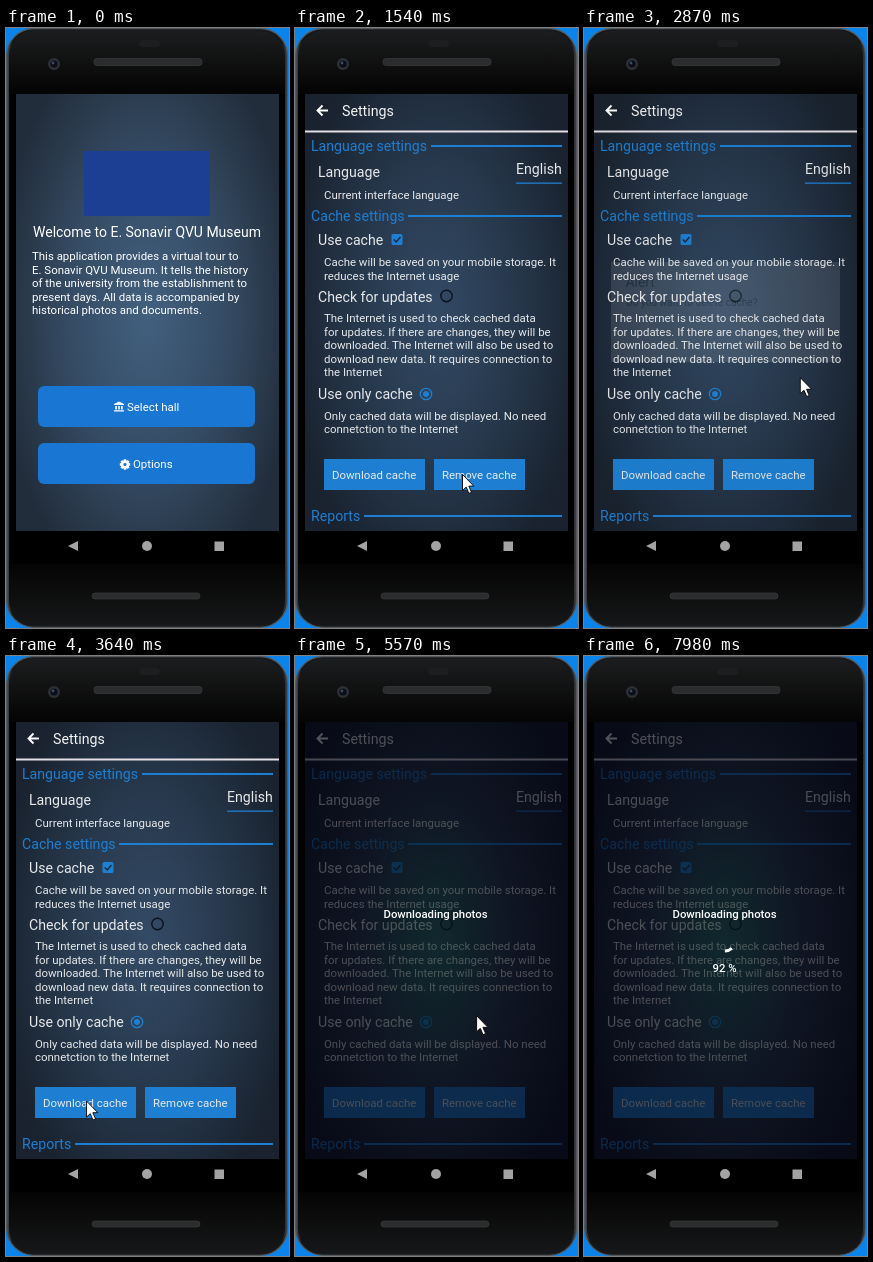
Recreate the animation shown at these times as an HTML page. Size 283x600 px, loop 8000 ms.

```html
<!DOCTYPE html>
<html lang="en">
<head>
<meta charset="utf-8">
<title>Museum app</title>
<style>
  html, body { margin: 0; width: 100%; height: 100%; overflow: hidden; background: #0a84ea; }
  svg { display: block; width: 283px; height: 600px; font-family: Roboto, sans-serif; }
</style>
</head>
<body>
<svg id="stage" viewBox="0 0 283 600" xmlns="http://www.w3.org/2000/svg"></svg>
<script>
const LOOP = 8000;
const SMALL = 11.45, BIG = 14.15;
const BLUE = '#1e7fd2';

const text = (x, y, str, size = SMALL, fill = '#e6e8ea', extra = '') =>
  `<text x="${x}" y="${y}" font-size="${size}" fill="${fill}" ${extra}>${str}</text>`;
const lines = (x, y, rows, fill) =>
  rows.map((row, i) => text(x, y + i * 13.5, row, SMALL, fill)).join('');
const rect = (x, y, w, h, fill, extra = '') =>
  `<rect x="${x}" y="${y}" width="${w}" height="${h}" fill="${fill}" ${extra}/>`;
const screenRect = (fill, extra) => rect(10, 66, 263, 437, fill, extra);
const glow = (id, inner, mid, outer) =>
  `<radialGradient id="${id}" gradientUnits="userSpaceOnUse" cx="0" cy="0" r="1"
    gradientTransform="translate(141 285) scale(150 290)">
    <stop stop-color="${inner}"/><stop offset=".55" stop-color="${mid}"/>
    <stop offset="1" stop-color="${outer}"/></radialGradient>`;

const defs = `<defs>
  ${glow('homeBg', '#42607f', '#344a62', '#222d3b')}
  ${glow('settingsBg', '#334a65', '#26374b', '#19222e')}
  ${glow('loadBg', '#001814', '#04040f', '#00000c')}
  <linearGradient id="rim" x2="1" y2="0">
    <stop stop-color="#4a4d50"/><stop offset=".02" stop-color="#17181a"/>
    <stop offset=".98" stop-color="#17181a"/><stop offset="1" stop-color="#3c3f42"/>
  </linearGradient>
  <linearGradient id="body" x2="0" y2="1">
    <stop stop-color="#1c1d1e"/><stop offset=".1" stop-color="#050505"/>
    <stop offset=".9" stop-color="#050505"/><stop offset="1" stop-color="#161718"/>
  </linearGradient>
  <clipPath id="screen">${screenRect('#000')}</clipPath>
  <clipPath id="wave"><path d="M0 3q7-5 14-1t14-1v15q-7 4-14 1t-14 1z"/></clipPath>
</defs>`;

const phone = `
  ${rect(0, 0, 283, 600, '#0a84ea')}
  ${rect(.7, .7, 280.8, 598.6, 'url(#rim)', 'rx="27" stroke="#55585b" stroke-width="1.2"')}
  ${rect(3, 3, 276, 594, 'url(#body)', 'rx="25"')}
  ${rect(4, 66, 275, 470, '#000')}
  ${rect(133, 12, 21, 7, '#1d1e20', 'rx="3.5"')}
  ${rect(88, 30.5, 108, 7, '#2b2c2e', 'rx="3" stroke="#3a3b3d" stroke-width=".7"')}
  ${rect(86, 565, 108, 6, '#2b2c2e', 'rx="3" stroke="#3a3b3d" stroke-width=".7"')}
  <circle cx="48" cy="36" r="6" fill="#2d3035"/><circle cx="48" cy="36" r="3.6" fill="#0b0e16"/>
  <circle cx="47" cy="35" r="1.4" fill="#3b4a68"/>
  <g fill="#a3a3a3"><path d="M62 518l10-5v10z"/><circle cx="141" cy="518" r="5"/>
  ${rect(208.5, 513.5, 9.5, 9.5, '#a3a3a3')}</g>`;

const teeth = Array.from({ length: 8 }, (_, i) =>
  rect(-1.3, -5.2, 2.6, 3, '#fff', `transform="rotate(${i * 45})"`)).join('');

const home = `
  ${screenRect('url(#homeBg)')}
  ${rect(78, 123, 126, 65, '#1d3f93')}
  ${text(27, 209, 'Welcome to E. Sonavir QVU Museum', 14, '#fff')}
  ${lines(26, 232, ['This application provides a virtual tour to',
    'E. Sonavir QVU Museum. It tells the history',
    'of the university from the establishment to',
    'present days. All data is accompanied by',
    'historical photos and documents.'], '#fff')}
  ${rect(32, 358, 217, 41, '#1976d2', 'rx="6"')}
  ${rect(32, 415, 217, 41, '#1976d2', 'rx="6"')}
  <path d="M108 377v-1l5-2.6 5 2.6v1zM109.3 378h1.6v3.6h-1.6zM112.2 378h1.6v3.6h-1.6zM115.1 378h1.6v3.6h-1.6zM108 382.2h10v1.4h-10z" fill="#fff"/>
  <g transform="translate(119 436.5)">${teeth}
    <circle r="2.8" fill="none" stroke="#fff" stroke-width="2.4"/></g>
  ${text(121, 383, 'Select hall', SMALL, '#fff')}
  ${text(127, 440, 'Options', SMALL, '#fff')}`;

const section = (y, title, lineX) =>
  text(16, y, title, BIG, BLUE) + rect(lineX, y - 6, 267 - lineX, 2, BLUE);
const label = (y, str) => text(23, y, str, BIG);

const settings = `
  ${screenRect('url(#settingsBg)')}
  <path d="M33 82.500H22.500M27.500 77.500l-5 5 5 5" fill="none" stroke="#fff" stroke-width="1.9"/>
  ${text(47, 88, 'Settings', 14.2, '#f4f4f4')}
  ${rect(10, 102.5, 263, 2, '#e4dfe4')}
  ${section(123, 'Language settings', 136)}
  ${label(149, 'Language')}
  ${text(221, 146, 'English', BIG)}
  ${rect(221, 154.5, 46, 1.3, BLUE)}
  ${text(29, 171, 'Current interface language')}
  ${section(193, 'Cache settings', 113)}
  ${label(217, 'Use cache')}
  ${rect(96.500, 206, 11, 11, BLUE, 'rx="1.5"')}
  <path d="M98.800 211.500l2.400 2.500 4.300-5" fill="none" stroke="#1b2a3b" stroke-width="1.4"/>
  ${lines(29, 238, ['Cache will be saved on your mobile storage. It', 'reduces the Internet usage'])}
  ${label(273.5, 'Check for updates')}
  <circle cx="151.500" cy="268" r="5.700" fill="none" stroke="#0c1118" stroke-width="1.400"/>
  ${lines(29, 294, ['The Internet is used to check cached data',
    'for updates. If there are changes, they will be',
    'downloaded. The Internet will also be used to',
    'download new data. It requires connection to',
    'the Internet'])}
  ${label(371, 'Use only cache')}
  <circle cx="131" cy="366" r="5.700" fill="none" stroke="${BLUE}" stroke-width="1.300"/>
  <circle cx="131" cy="366" r="3" fill="${BLUE}"/>
  ${lines(29, 391.5, ['Only cached data will be displayed. No need', 'connetction to the Internet'])}
  ${rect(29, 431, 101, 31, BLUE)}${rect(139, 431, 91, 31, BLUE)}
  ${text(37, 451, 'Download cache')}${text(147, 451, 'Remove cache')}
  ${section(493, 'Reports', 69)}`;

const alertBox = `
  ${rect(27, 234, 229, 100, '#fff')}
  ${text(41.5, 258.5, 'Alert', 13.9, '#111')}
  ${text(42, 278, 'Do you want to delete cache?', 10.15, '#222')}
  ${text(180.5, 319.5, 'No', 9.5, '#2a567f')}${text(222, 319.5, 'Ok', 9.5, '#2a567f')}`;

const flags = [
  rect(0, 0, 28, 20, '#23408e') +
    `<path d="M0 1l28 17M28 1L0 18" stroke="#fff" stroke-width="4"/>
     <path d="M0 1l28 17M28 1L0 18" stroke="#d0233b" stroke-width="1.300"/>
     <path d="M14 0v20M0 9.500h28" stroke="#fff" stroke-width="6"/>
     <path d="M14 0v20M0 9.500h28" stroke="#d0233b" stroke-width="3.400"/>`,
  rect(0, 0, 28, 20, '#f4f4f4') +
    `<path d="M0 9q7-5 14-1t14-1v5q-7 4-14 1t-14 1z" fill="#2450a8"/>
     <path d="M0 13q7-4 14-1t14-1v9H0z" fill="#d8293a"/>`,
  rect(0, 0, 28, 20, '#cf3a42') +
    `<path d="M0 13q7-4 14-1t14-1v9H0z" fill="#3f9a4a"/>
     ${rect(0, 0, 4.5, 20, '#f1dede')}
     <path d="M2.200 0v20" stroke="#cf3a42" stroke-width="2" stroke-dasharray="2 1.200"/>`
];
const languageRow = (y, name, flagX, flag) => `
  ${rect(40, y - 6, 11, 11, '#fff', 'rx="1.5" stroke="#2f7fd6" stroke-width="1.5"')}
  ${text(65.5, y + 4.5, name, SMALL, '#707070')}
  <g transform="translate(${flagX} ${y - 10})" clip-path="url(#wave)">${flag}</g>`;

const picker = `
  ${rect(28.5, 190, 225.5, 187.5, '#fff')}
  ${text(39.5, 206, 'Please, select language(-s) to download', SMALL, '#757575')}
  ${languageRow(236.5, 'English', 108.5, flags[0])}
  ${languageRow(280, 'Русский', 115.5, flags[1])}
  ${languageRow(323.5, 'Беларуская', 134.5, flags[2])}
  <g id="tick">${rect(39.3, 229.8, 12.4, 12.4, '#2f7fd6', 'rx="1.5"')}
    <path d="M42 236l2.600 2.700 4.800-5.500" fill="none" stroke="#fff" stroke-width="1.600"/></g>
  ${text(88, 366.5, 'Cancel', SMALL, '#2878d0')}${text(145, 366.5, 'Download', SMALL, '#2878d0')}`;

const centered = 'text-anchor="middle" font-weight="500"';
const loading = `
  ${screenRect('url(#loadBg)', 'opacity=".68"')}
  ${text(140.5, 262, 'Downloading photos', 11.35, '#fff', centered)}
  <g id="progress">
    <path id="arc" fill="none" stroke="#fff" stroke-width="3"/>
    ${text(140.5, 315.5, '', 11.35, '#fff', centered + ' id="percent"')}
  </g>`;

const stage = document.getElementById('stage');
stage.innerHTML = `${defs}${phone}
  <g clip-path="url(#screen)">
    ${screenRect('#fff')}
    <g id="home">${home}</g><g id="settings">${settings}</g>
    ${screenRect('#000', 'id="dim"')}
    <g id="alert">${alertBox}</g><g id="picker">${picker}</g><g id="loading">${loading}</g>
  </g>
  <path id="cursor" d="M.5.500v16l3.700-3.400 2.700 6.300 2.600-1.100-2.700-6.200h5z" fill="#fff" stroke="#000" stroke-width=".9"/>`;
const el = id => document.getElementById(id);

const clamp = v => Math.min(1, Math.max(0, v));
const ramp = (t, from, to) => clamp((t - from) / (to - from));
const ease = u => u * u * (3 - 2 * u);
const mix = (a, b, u) => a + (b - a) * u;

// time, x, y of the pointer tip
const pointerPath = [
  [150, 233, 561], [610, 140, 435], [930, 140, 435], [1230, 139, 439], [1440, 139, 439],
  [1540, 167, 446], [1840, 167, 446], [2100, 174, 427], [2550, 225, 316], [2770, 225, 316],
  [2870, 216, 349], [3460, 80, 445], [3640, 80, 445], [4180, 109, 218], [4400, 88, 226],
  [4730, 88, 226], [5080, 190, 366], [5250, 181, 359], [5570, 181, 359], [6350, 271, 562],
  [6480, 284, 600]
];

function pointerAt(t) {
  const i = pointerPath.findIndex(p => p[0] > t);
  if (i < 1) return null;
  const [a, b] = [pointerPath[i - 1], pointerPath[i]];
  const u = ramp(t, a[0], b[0]);
  return [mix(a[1], b[1], u), mix(a[2], b[2], u)];
}

function show(id, opacity) {
  el(id).setAttribute('opacity', opacity);
  el(id).setAttribute('display', opacity > 0 ? 'inline' : 'none');
}

function zoom(id, scale) {
  el(id).setAttribute('transform',
    `translate(141.5 284.5) scale(${scale}) translate(-141.5 -284.5)`);
}

function spinnerArc(t) {
  const turns = (t - 7980) / 1333 + 2;
  const n = Math.floor(turns), u = turns - n;
  const base = 50 + 270 * n + 216 * (turns - 2) - 540;
  const start = base + 270 * ease(clamp(2 * u - 1));
  const end = base + 38 + 270 * ease(clamp(2 * u));
  const point = deg => {
    const a = deg * Math.PI / 180;
    return `${140.5 + 11.5 * Math.cos(a)} ${283.5 + 11.5 * Math.sin(a)}`;
  };
  return `M${point(start)}A11.5 11.5 0 ${end - start > 180 ? 1 : 0} 1 ${point(end)}`;
}

function render(t) {
  const swap = ramp(t, 880, 1200);
  const p = swap * (1.3 - .3 * swap);
  show('home', 1 - p);
  zoom('home', 1 - .03 * p);
  show('settings', p);
  zoom('settings', 1.1 - .1 * p);

  const alertIn = ramp(t, 1840, 2180) * (1 - ramp(t, 2740, 2885));
  const pickerIn = t < 5570 ? ramp(t, 3640, 3860) : 0;
  show('alert', alertIn);
  show('picker', pickerIn);
  show('dim', .36 * Math.max(alertIn, pickerIn));
  show('tick', t >= 4750 ? 1 : 0);

  show('loading', t >= 5570 ? 1 : 0);
  show('progress', t >= 5640 ? 1 : 0);
  el('arc').setAttribute('d', spinnerArc(t));
  el('percent').textContent = `${Math.round(92 * ramp(t, 5640, 7970))} %`;

  const tip = pointerAt(t);
  show('cursor', tip ? 1 : 0);
  if (tip) el('cursor').setAttribute('transform', `translate(${tip[0]} ${tip[1]})`);
}

const begin = performance.now();
function tick() {
  render((performance.now() - begin) % LOOP);
  requestAnimationFrame(tick);
}
tick();
</script>
</body>
</html>
```
